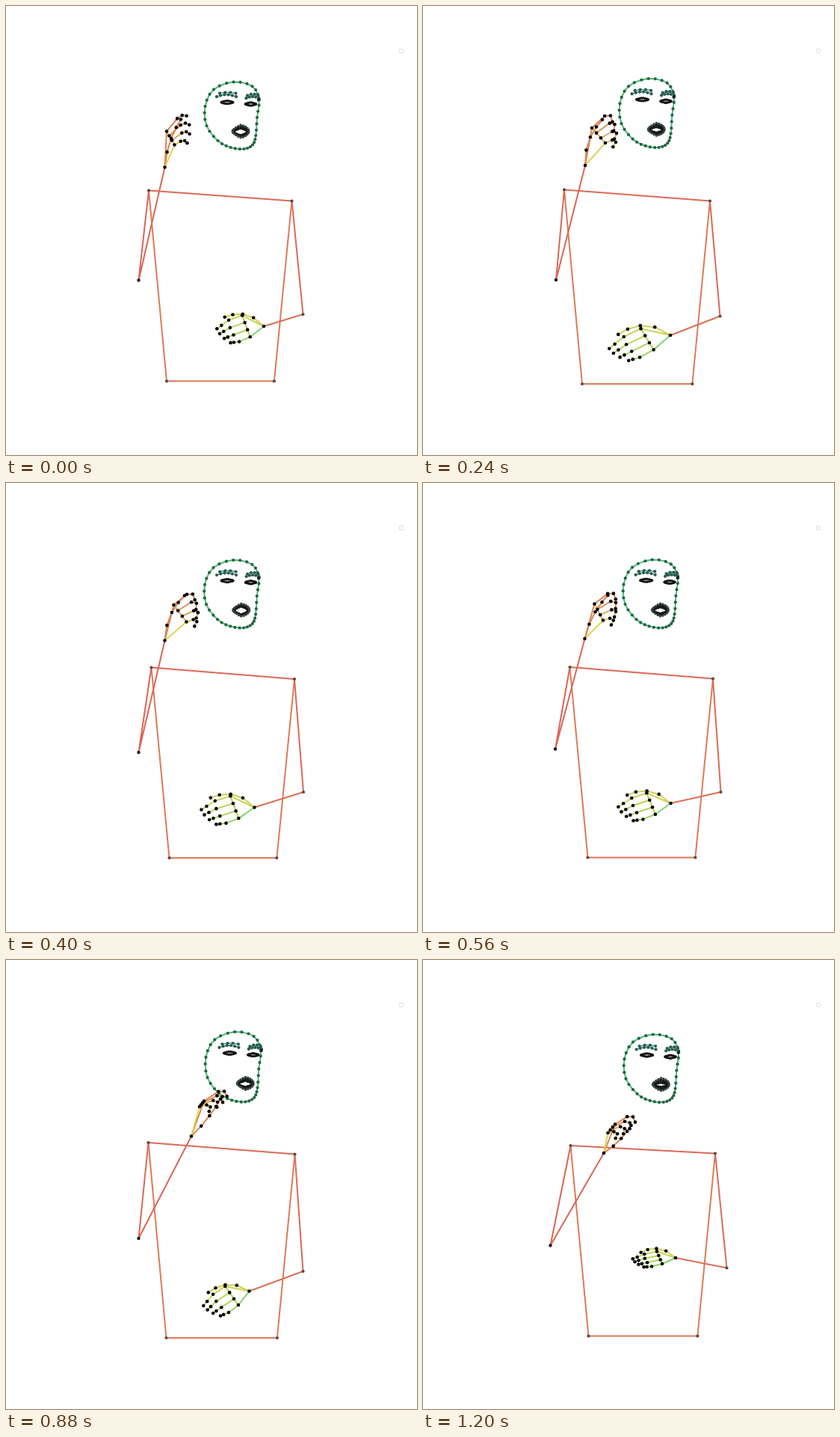
Animation, 550 px wide and 600 px high, one loop 1.28 s. Source, as an HTML page with a canvas:

```html
<!DOCTYPE html>
<html lang="en">
<head>
<meta charset="utf-8">
<title>Pose skeleton</title>
<style>
  html, body { margin: 0; width: 100%; height: 100%; overflow: hidden; background: #fff; }
  canvas { display: block; width: 550px; height: 600px; }
</style>
</head>
<body>
<canvas id="stage" width="550" height="600"></canvas>
<script>
const ctx = document.getElementById('stage').getContext('2d');
const STEP = 80, STEPS = 16, FINGERS = [0, 1, 2, 3];
const tracks = {};

// Each named part has its own keys: [step, numbers]
function pose(step, parts) {
  for (const name in parts) (tracks[name] = tracks[name] || []).push([step, parts[name]]);
}

// torso:  left shoulder, right shoulder, hip height
// raised: wrist, then from it index knuckle; knuckle row; from wrist thumb tip; bend
// resting: wrist, reach to the middle fingertip, spread of the knuckles
// face:   left, top, height, turn, mouth opening
pose(0, {
  torso: [191, 246.5, 382.5, 260.5, 501.3], elbowA: [177.5, 366.5], elbowB: [397.5, 412],
  raised: [212.5, 215.5, 2.5, -48, 10.5, 18, 21.5, -64, 0.85],
  resting: [345, 428, -58.5, 9.5, 30], face: [266, 101.5, 90, 0, 3]
});
pose(3, {
  torso: [189, 245.5, 384, 260.5, 505], elbowA: [178, 366], elbowB: [397.5, 414.5],
  raised: [217, 213, 9, -50, 18, 20, 23, -61, 2],
  resting: [331, 440, -75.5, 23.5, 32], face: [263, 97, 92.5, 1.3, 2]
});
pose(5, {
  torso: [194.5, 246.5, 386, 262, 501], elbowA: [177.5, 360], elbowB: [398, 413],
  raised: [212.5, 210.5, 12, -47.5, 17, 22.5, 26.5, -60, 1.85],
  resting: [332.5, 433.5, -66.5, 9.5, 31], face: [265.5, 103, 91, 1.3, 3.6]
});
pose(7, {
  torso: [196.5, 246, 388, 261.5, 500.5], elbowA: [177, 355.5], elbowB: [398.5, 413],
  raised: [216.5, 208, 13, -46.5, 11.5, 22, 31, -58, 1.8],
  resting: [331.5, 428, -65.5, 11, 30], face: [268, 102.5, 91.5, 1.5, 2.6]
});
pose(9, {
  torso: [192, 243, 388.5, 259.5, 505], elbowA: [176, 364], elbowB: [399, 416.5],
  raised: [240, 223, 15, -45.5, -5, 6, 36, -55, 1.65],
  resting: [323, 440.5, -67.5, 21, 31], face: [268, 96, 94, 4.5, 2.2]
});
pose(11, {
  torso: [190.5, 244, 386.5, 259.5, 505], elbowA: [177.5, 372], elbowB: [397.5, 416],
  raised: [248, 235.5, 17, -47, -6, 7.5, 39, -49.5, 1.55],
  resting: [325.5, 442.5, -55.5, 24.5, 30], face: [267, 96, 94, 5.3, 2.4]
});
pose(13, { elbowA: [163, 379] });
pose(15, {
  torso: [197.5, 248, 391, 258.5, 502.5], elbowA: [170.5, 381.5], elbowB: [406.5, 411.5],
  raised: [242, 258, 15, -38.5, -9.5, 11.5, 36.5, -37, 1.65],
  resting: [338, 398, -54, 5, 17], face: [269, 99.5, 91, 1.4, 1.2]
});

// Corners of the face curve in a 72.5 by 90 box
const OVAL = [
  [38.5, 0], [63.5, 5.8], [72.5, 23.5], [70, 47.5], [68.3, 71.5], [64, 84],
  [52.5, 89.5], [34.5, 87.5], [17.5, 78.5], [2.5, 58.5], [0.5, 32.5], [12, 10]
];
// Thumb, four fingers, palm edge
const COLORS_A = ['#dc8258', '#dc8458', '#dc965a', '#dcac5c', '#dac85c', '#d8d854'];
const COLORS_B = ['#d2ce54', '#c8d456', '#bcd459', '#b0d45c', '#9cd462', '#7ed66c'];

const add = (p, q, k = 1) => [p[0] + q[0] * k, p[1] + q[1] * k];
const mix = (p, q, u) => [p[0] + (q[0] - p[0]) * u, p[1] + (q[1] - p[1]) * u];
const side = ([x, y]) => [y, -x];
const turned = ([x, y], a) =>
  [x * Math.cos(a) - y * Math.sin(a), x * Math.sin(a) + y * Math.cos(a)];

// Smooth curve through the keys of one part
function at(name, step) {
  const keys = tracks[name];
  let i = 0;
  while (i < keys.length - 2 && step >= keys[i + 1][0]) i++;
  const key = n => keys[Math.max(0, Math.min(keys.length - 1, n))];
  const [k0, k1, k2, k3] = [key(i - 1), key(i), key(i + 1), key(i + 2)];
  const span = k2[0] - k1[0], u = (step - k1[0]) / span;
  return k1[1].map((p, n) => {
    const q = k2[1][n];
    const m1 = (q - k0[1][n]) / (k2[0] - k0[0]) * span;
    const m2 = (k3[1][n] - p) / (k3[0] - k1[0]) * span;
    const d = q - p;
    return p + u * (m1 + u * (3 * d - 2 * m1 - m2 + u * (m1 + m2 - 2 * d)));
  });
}

// Closed smooth curve, `count` points per corner
function loop(corners, count) {
  const n = corners.length, out = [];
  for (let i = 0; i < n; i++) {
    const [a, b, c, d] = [n - 1, 0, 1, 2].map(k => corners[(i + k) % n]);
    for (let j = 0; j < count; j++) {
      const u = j / count;
      out.push([0, 1].map(k => b[k] + u / 2 * (c[k] - a[k] + u * (2 * a[k] - 5 * b[k] + 4 * c[k] - d[k]
        + u * (3 * b[k] - a[k] - 3 * c[k] + d[k])))));
    }
  }
  return out;
}

function line(points, color, width = 2, close = false) {
  ctx.beginPath();
  points.forEach(p => ctx.lineTo(p[0], p[1]));
  if (close) ctx.closePath();
  ctx.strokeStyle = color;
  ctx.lineWidth = width;
  ctx.stroke();
}

function dots(points, color, r) {
  ctx.fillStyle = color;
  for (const [x, y] of points) {
    ctx.beginPath();
    ctx.arc(x, y, r, 0, 2 * Math.PI);
    ctx.fill();
  }
}

// Ellipse whose left and right ends are drawn to a point
function lens(cx, cy, rx, ry, count, left, right) {
  return Array.from({ length: count }, (_, i) => {
    const a = i / count * 2 * Math.PI, c = Math.cos(a);
    const pinch = 1 - Math.abs(c) * (c < 0 ? left : right);
    return [cx + rx * c, cy + ry * Math.sin(a) * pinch];
  });
}

const thumb = (wrist, tip, bulge) => [0.3, 0.58, 0.82, 1].map(u =>
  add(add(wrist, tip, u), side(tip), bulge * 4 * u * (1 - u)));

// Fingers bent towards the face
function raisedHand([wx, wy, kx, ky, ax, ay, tx, ty, bend]) {
  const wrist = [wx, wy], knuckle = [kx, ky];
  const fingers = FINGERS.map(i => {
    const base = add(add(wrist, knuckle), [ax, ay], i / 3);
    const dir = turned(knuckle, 0.76 + 0.12 * (i - 1));
    const bone = 13 * (1 - 0.1 * i) / Math.hypot(kx, ky);
    const curl = bend * (1 - 0.3 / (i + 1));
    const mid = add(base, dir, 0.42 * (1.1 - 0.07 * i * i));
    return [base, mid, add(mid, turned(dir, curl / 2), bone * 0.6), add(mid, turned(dir, curl), bone)];
  });
  return [wrist, thumb(wrist, [tx, ty], ax * 0.006), ...fingers];
}

// Fingers laid out along the reach and across the knuckles
function restingHand([wx, wy, rx, ry, spread]) {
  const wrist = [wx, wy], reach = [rx, ry];
  const across = add([-rx * 0.1, -ry * 0.1], side(reach), spread / Math.hypot(rx, ry));
  const spot = (a, b) => add(add(wrist, reach, a), across, b);
  const fingers = FINGERS.map(i => {
    const mid = spot(0.74 - 0.025 * (i - 1.15) ** 2, 0.34 * i - 0.52);
    const tip = spot(1.03 - 0.02 * i * i, 0.24 * i - 0.23);
    return [spot(0.38, i / 3 - 0.63), mid, mix(mid, tip, 0.62), tip];
  });
  return [wrist, thumb(wrist, add(spot(0.77, -0.68), wrist, -1), -0.18), ...fingers];
}

function drawHand([wrist, ...fingers], colors) {
  const rows = fingers.map((f, i) => i < 2 ? [wrist, ...f] : f);
  for (let i = 4; i >= 0; i--) line(rows[i], colors[i]);
  line(fingers.slice(1).map(f => f[0]), colors[3]);
  line([wrist, fingers[4][0]], colors[5]);
  dots([wrist, ...fingers.flat()], '#000', 2.3);
}

function drawEye(cx, cy, rx) {
  line(lens(cx, cy, rx, 2.2, 20, 0.5, 0.5), '#222', 2, true);
  for (let x = -6; x <= 6; x += 2) line([[cx + x, cy - 2], [cx + x, cy + 2]], '#444', 1.2);
  dots(lens(cx, cy, rx, 2.4, 18, 0.5, 0.5), '#111', 1.5);
}

function drawMouth(cx, cy, open) {
  for (let k = 3; k >= 0; k--) {
    const u = k / 3;
    const lip = lens(cx, cy + u * 0.6, 11 - 1.6 * u, 8.5 + (open - 7.1) * u, 20, 0.45, 0.15 + 0.3 * u);
    line(lip, k ? '#333' : '#5c7a70', 1, true);
    dots(lip, k ? '#161616' : '#34423d', 1.6);
  }
}

function drawBrow(x, y, x0, x1, y0, arch, count) {
  const row = Array.from({ length: count }, (_, i) => {
    const u = i / (count - 1);
    return [x + x0 + (x1 - x0) * u, y + y0 - arch * Math.sin(Math.PI * u)];
  });
  line(row, '#4ca492', 1.6);
  dots(row, '#2a5a50', 2.1);
}

function drawFace([x, y, h, turn, open]) {
  const w = 72.5 + turn / 4;
  const oval = loop(OVAL, 3).map(p => [x + p[0] / 72.5 * w, y + p[1] / 90 * h]);
  line(oval, '#46b07a', 1.8, true);
  line(oval.slice(19).concat([oval[0]]), '#54c474', 1.8);
  dots(oval, '#256444', 2.1);

  const ex = x + 30 + turn * 0.45, ey = y + h * 0.302;
  drawBrow(ex, ey, -14, 12, -7.5, 2.8, 6);
  drawBrow(ex, ey, -10, 11.5, -12, 1.3, 4);
  drawBrow(ex, ey, 25.5, 42.5, -5.5, 2, 5);
  drawBrow(ex, ey, 27, 41.5, -9, 2, 4);
  dots([[ex + 42.2, ey - 3.5]], '#18231f', 2.3);
  drawEye(ex, ey, 8);
  drawEye(ex + 31.4, ey + 2.3, 7.2);
  drawMouth(x + 48 + turn, y + h * 0.733, open);
}

function draw(step) {
  const [lx, ly, rx, ry, hip] = at('torso', step);
  const left = [lx, ly], right = [rx, ry];
  const torso = [right, [rx - 23.6, hip], [lx + 24, hip], left];
  const elbowA = at('elbowA', step), elbowB = at('elbowB', step);
  const handA = raisedHand(at('raised', step)), handB = restingHand(at('resting', step));

  ctx.fillStyle = '#fff';
  ctx.fillRect(0, 0, 550, 600);
  ctx.lineJoin = 'round';
  ctx.strokeStyle = '#e2e2e2';
  ctx.lineWidth = 1;
  ctx.strokeRect(526.5, 57.5, 5, 5);

  line(torso, '#dc7a57');
  line([left, right], '#dc6a57');
  line([left, elbowA, handA[0]], '#da6657');
  line([right, elbowB], '#da6a57');
  line([elbowB, handB[0]], '#dc7057');
  dots([...torso, elbowB], '#5c4a40', 2.1);
  dots([elbowA], '#1c1614', 2.2);
  drawFace(at('face', step));
  drawHand(handA, COLORS_A);
  drawHand(handB, COLORS_B);
}

function tick() {
  draw(Math.floor(performance.now() / STEP) % STEPS);
  requestAnimationFrame(tick);
}
tick();
</script>
</body>
</html>
```
